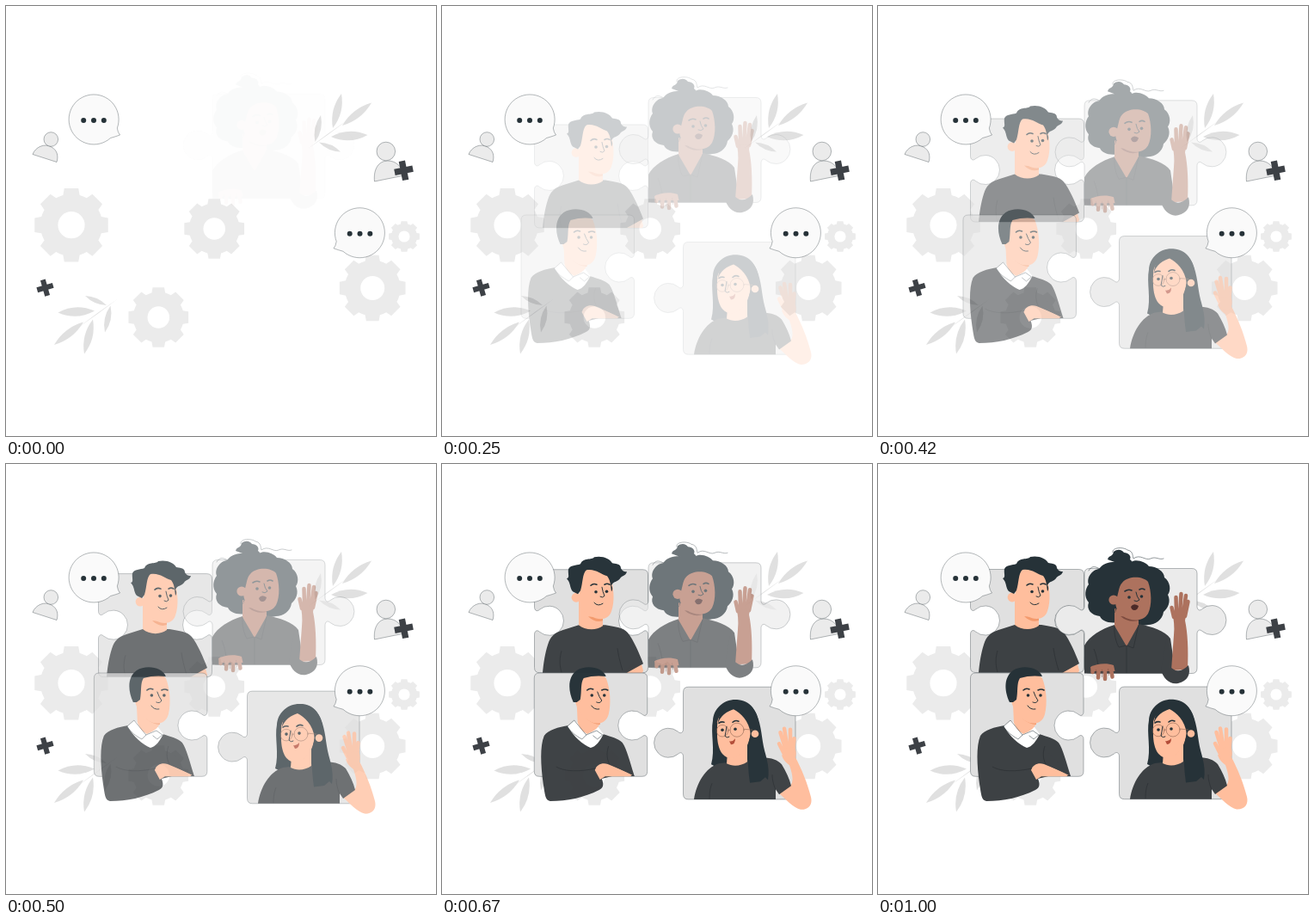
Animation of 500 by 500 pixels, one loop 1.04 s. Source, as an HTML page:

```html
<!DOCTYPE html>
<html lang="en">
<head>
<meta charset="utf-8">
<title>Puzzle team</title>
<style>
  html, body { margin: 0; width: 100%; height: 100%; overflow: hidden; background: #fff; }
  svg { display: block; width: 100vw; height: 100vh; }
  .ink { fill: #263238; }
  .cloth { fill: #3d4144; }
  .fair { fill: #ffbe9d; }
  .brown { fill: #ad725e; }
  .shade { fill: #f39a6d; }
  .line { fill: none; stroke: #263238; stroke-width: 1; stroke-linecap: round; stroke-linejoin: round; }
  .brow { fill: none; stroke: #263238; stroke-width: 1.6; stroke-linecap: round; }
  .thin { stroke: #263238; stroke-width: .35; }
  .fine { stroke-width: .5; }
  .fingers { fill: none; stroke-width: 4.5; stroke-linecap: round; }
  .fair.fingers { fill: none; stroke: #ffbe9d; }
  .brown.fingers { fill: none; stroke: #ad725e; }
  .fold { fill: none; stroke: #24292c; stroke-width: .5; }
</style>
</head>
<body>
<svg viewBox="0 0 500 500">
  <g id="gears" fill="#ebebeb" fill-rule="evenodd"></g>
  <g id="plant" fill="#e0e0e0"></g>
  <use href="#plant" transform="translate(481 506.5) rotate(180)"/>

  <g id="icons">
    <g class="thin" fill="#ebebeb">
      <path d="M31 172.5C34 164 45 159 53 164C60 168 61 175 59 181.5Z"/>
      <circle cx="52.3" cy="155" r="8.3"/>
      <path d="M428.5 204C427 190 433 180 444 180C453 180 460 186 463 197Z"/>
      <circle cx="441.8" cy="169" r="10.8"/>
    </g>
    <g stroke="#3d4146" fill="none">
      <path d="M-10.8 0H10.8M0-11.3V11.3" stroke-width="7.4" transform="translate(462.5 191.3) rotate(-11)"/>
      <path d="M-9.6 0H9.6M0-9.6V9.6" stroke-width="6" transform="translate(45.5 327.6) rotate(-16)"/>
    </g>
  </g>

  <g id="boy">
    <path class="piece thin" fill="#e0e0e0" data-box="107.5 122.5 132 120 182" data-tabs="-1 -1"/>
    <path class="fair" d="M214 242.5L231 229L234 240L233 242.5Z"/>
    <path class="cloth" d="M117 242.5C118 231 120 219 123 210C126 200 131 196 140 193L159 187H190C202 189 211 190 216 196C223 205 229 219 234 232L215 242.5Z"/>
    <path class="fold" d="M139 242C136 232 137 224 139 217M210 240C207 230 205 222 204 214"/>
    <path class="fair" d="M159 158V187C166 193 179 194 187 188V180Z"/>
    <path class="shade" d="M170 177C175 182 181 184 187 182V179Z"/>
    <circle class="fair" cx="156" cy="155" r="5.4"/>
    <path class="fair" d="M160 148L163 126C171 118 190 119 196 130C200 145 201 160 197 171C194 181 183 182 174 177C166 173 160 167 159 160Z"/>
    <path class="ink" d="M158 151L152 148C148 143 150 138 145 133C149 132 146 127 147 122C149 117 156 118 161 116C164 108 174 112 177 108C187 106 195 110 198 115C201 116 208 115 208 121C210 125 213 125 215 125C213 131 209 129 207 133C204 137 199 136 197 141C199 144 198 147 197 148C196 141 196 135 192 130C185 128 178 121 168 123C163 127 164 138 161 147Z"/>
    <path class="brow" d="M173 141Q176 138 180 140M189 140Q192 138 195 140"/>
    <path class="line" d="M186 143Q187 149 189 153Q187 156 184 154M177 161Q181 166 187 162"/>
    <g class="ink"><circle cx="179" cy="148.5" r="1.8"/><circle cx="191.5" cy="148" r="1.8"/></g>
  </g>

  <g id="curly">
    <path class="piece thin" fill="#ebebeb" data-box="240 121.5 131 122 181.5" data-tabs="1 1"/>
    <path class="ink" d="M267 111C268 106 273 108 274 102C279 98 284 100 286 103C291 103 295 107 293 111C299 115 292 119 287 118L294 114C301 110 311 114 315 119C324 119 333 125 333 132C340 137 341 147 337 152C341 160 337 168 332 172C331 181 322 187 314 187C305 189 291 188 279 184C268 186 260 182 258 177C248 176 242 169 245 161C239 154 241 145 245 140C242 132 249 123 257 122C262 115 269 114 275 114Z"/>
    <path class="line fine" d="M273 103C271 97 285 96 290 100C297 101 296 108 297 110C305 104 311 113 317 110C323 107 327 112 332 110M258 122C251 118 248 119 245 124"/>
    <path class="cloth" d="M240 243.5V211C246 200 259 192 275 187L289 209L303 186C318 189 334 194 340 203L346 243.5Z"/>
    <path class="brown" d="M275 168V188L289 212L303 187V174Z"/>
    <path class="fold" d="M275 188C274 197 277 208 280 213L289 211L297 214L303 187M289 211V243M257 242C256 232 254 222 251 215"/>
    <path d="M282 177Q291 185 303 182V179Z" fill="#7d4b3f"/>
    <circle class="brown" cx="274" cy="158" r="5.6"/>
    <path class="brown" d="M276 159C280 153 279 143 284 138C292 129 309 131 314 137C318 148 319 164 314 174C308 184 294 183 285 177C279 173 276 167 276 159Z"/>
    <circle class="line fine" cx="271.5" cy="169.5" r="5"/>
    <path class="brow" d="M287 148Q291 145 295 147M304 146Q307 144 310 146"/>
    <path class="line" d="M300 149Q301 155 304 158Q301 161 298 159"/>
    <g class="ink"><circle cx="292" cy="155" r="1.8"/><circle cx="306.5" cy="154" r="1.8"/></g>
    <path d="M294 166Q297 161 303 165Q302 170 298 170Q295 170 294 166Z" fill="#4b2a28"/>
    <path class="brown" d="M342 172C344 180 345 190 344 199L341 240L360 239C361 215 360 196 357 182L359 170Z"/>
    <path class="brown fingers" d="M344 178L341.500 167M347 174L346.500 155M351 174L352.500 151M355 174L358 153M357 177L360.500 160"/>
    <path class="cloth" d="M336 200C341 206 341 222 341 237Q350 245 361 234C364 245 360 252 349 255C339 257 332 249 329 240Z"/>
    <path class="brown fingers" d="M250 237L249.500 242M257 237L256 248.500M264 236L264 250M270.500 236L272.500 247.500"/>
    <path class="brown" d="M247 236C254 232 266 231 274 234L275.500 241H248Z"/>
    <path class="fold" d="M253.500 239V245M260.500 239V248M267.500 238L268.500 246" style="stroke:#7d4b3f"/>
  </g>

  <g id="man">
    <path class="piece thin" fill="#e0e0e0" data-box="107.5 243 131.5 120.3 304" data-tabs="0 -1"/>
    <path class="cloth" d="M148 304C135 306 124 309 119 316C114 328 115 350 118 372C120 384 120 391 126 392C146 392 165 388 183 379C189 376 188 371 186 366L198 363L224 363C219 347 215 331 210 324C205 319 197 317 187 314Z"/>
    <path fill="#fff" d="M146 305L154 298L165 306H182L188 314C184 322 179 329 173 330C163 326 154 317 146 305Z"/>
    <path class="fair" d="M157 280L158 301C161 308 164 311 169 314C176 311 181 308 184 302V296Z"/>
    <path class="line fine" d="M146 305L154 298L168 315L163 320C156 316 150 312 146 305M168 315L180 310L187 315L181 320L176 316"/>
    <path class="shade" d="M168 296Q176 303 184 303V299Z"/>
    <path class="fair" d="M157 266L162 247C172 243 187 243 191 249C196 262 197 278 194 291C191 303 179 304 170 298C162 293 157 284 155 276Z"/>
    <path class="ink" d="M153 277C146 262 147 247 157 240C168 233 187 236 191 247C184 246 174 246 165 249C161 255 163 264 161 274L157 277Z"/>
    <path class="brow" d="M169 263Q172 260 176 262M186 263Q190 261 193 263"/>
    <path class="line" d="M181 265Q183 271 186 275Q184 279 180 277M174 281Q177 286 183 285"/>
    <g class="ink"><circle cx="174.5" cy="269" r="1.8"/><circle cx="189" cy="269" r="1.8"/></g>
    <path class="fair" d="M178 356C180 349 187 347 193 349L222 361L219 363.3H190L184 367Z"/>
    <path class="cloth" d="M195 349C191 341 193 335 194 331L224 363C214 358 204 353 195 349Z"/>
    <path class="fold" d="M133 352C143 358 160 358 179 354M195 349C191 341 192 334 194 328"/>
  </g>

  <g id="girl">
    <path class="piece thin" fill="#e0e0e0" data-box="280.5 259 130.5 130.7 324" data-tabs="1 0"/>
    <path class="ink" d="M315 298C316 283 329 272 345 274C361 276 368 290 369 307L372 352L330 356C322 354 317 351 313 349C318 332 312 313 315 298Z"/>
    <path class="fair" d="M404 350C408 362 409 369 405 374L390 381C399 389 409 400 417 401.5C427 402 431 395 429 387C425 371 418 354 411 341L395 338C396 343 400 347 404 350Z"/>
    <path class="fair fingers" d="M398 337L392 325M400 333L393.5 312M402 332L398 307.5M405 332L405 308.5M408 335L409.500 319"/>
    <path class="fair" d="M396 331L410 329C413 335 412 343 407 346C400 346 395 339 396 331Z"/>
    <path class="cloth" d="M293 389.7C296 371 306 353 322 348L354 344C373 339 388 341 395 349C400 357 404 366 406 374L392 384L388 378V389.7Z"/>
    <path class="fold" d="M388 379C385 371 384 366 384 361M311 389C311 381 312 376 314 371"/>
    <path class="fair" d="M332 335L331 348C338 352 348 351 355 346V320Z"/>
    <path class="shade" d="M332 341Q344 341 350 334L340 338Z"/>
    <path class="fair" d="M320 300C322 290 330 284 340 284C350 287 357 296 359 309C358 327 350 339 338 342C326 342 321 332 320 317Z"/>
    <path class="ink" d="M324 285C333 273 351 273 361 283C369 292 371 309 373 323C375 337 382 350 379 367L376 364L370 369L358 370.5C356 356 355 342 356 326L359 314C357 298 347 289 339 285C332 287 323 292 320 304Z"/>
    <circle class="fair" cx="364" cy="313.5" r="4.3"/>
    <circle class="line fine" cx="365.5" cy="322.5" r="4"/>
    <g class="line" style="stroke:#8d6652;stroke-width:.6">
      <circle cx="326" cy="310" r="6.8"/><circle cx="343" cy="309" r="8"/><path d="M333 309H335M351 308L361 309"/>
    </g>
    <path class="brow" d="M322 301Q325 299 328 300M338 300Q341 297 345 299"/>
    <path class="line" d="M331 305Q330 312 329 316Q331 319 334 317"/>
    <g class="ink"><circle cx="326" cy="309" r="1.8"/><circle cx="341" cy="308" r="1.8"/></g>
    <path d="M334 322Q338 323 341 319Q341 326 336 326Z" fill="#b34d38"/>
  </g>

  <g id="bubble">
    <path class="thin" fill="#fafafa" d="M121.5 153.5A29 29 0 1 1 129.3 142Q130 147 132.5 150Q127 152 121.5 153.5Z"/>
    <g class="ink"><circle cx="90.2" cy="133" r="3"/><circle cx="102" cy="133" r="3"/><circle cx="113.8" cy="133" r="3"/></g>
  </g>
  <use href="#bubble" transform="translate(513.5 131.8) scale(-1 1)"/>
</svg>
<script>
  const LOOP = 1040, STEP = 1000 / 24, SHIFT = 20;
  const $ = id => document.getElementById(id);

  function addPath(parent, d) {
    const path = document.createElementNS('http://www.w3.org/2000/svg', 'path');
    path.setAttribute('d', d);
    parent.appendChild(path);
  }

  function gear(cx, cy, radius, hole) {
    const at = (angle, r) => `${cx + r * Math.cos(angle)} ${cy + r * Math.sin(angle)}`;
    const root = radius * 0.83;
    let d = '';
    for (let i = 0; i < 8; i++) {
      const a = i * Math.PI / 4;
      d += `${i ? `A${root} ${root} 0 0 1 ` : 'M'}${at(a - 0.27, root)}` +
        `L${at(a - 0.19, radius)}L${at(a + 0.19, radius)}L${at(a + 0.27, root)}`;
    }
    d += `A${root} ${root} 0 0 1 ${at(-0.27, root)}Z`;
    d += `M${cx - hole} ${cy}a${hole} ${hole} 0 1 0 ${2 * hole} 0a${hole} ${hole} 0 1 0 ${-2 * hole} 0Z`;
    addPath($('gears'), d);
  }

  // A pointed leaf; bulge is the control distance relative to its length.
  function leaf(x1, y1, x2, y2, bulge) {
    const mx = (x1 + x2) / 2, my = (y1 + y2) / 2;
    const nx = (y1 - y2) * bulge, ny = (x2 - x1) * bulge;
    addPath($('plant'), `M${x1} ${y1}Q${mx + nx} ${my + ny} ${x2} ${y2}Q${mx - nx} ${my - ny} ${x1} ${y1}Z`);
  }

  // One knob on a vertical edge: side is its x direction, dir the drawing direction.
  function knob(side, dir) {
    return `c0 ${4 * dir} ${3 * side} ${6 * dir} ${6 * side} ${3 * dir}` +
      `a17 17 0 1 ${side * dir > 0 ? 1 : 0} 0 ${26 * dir}` +
      `c${-3 * side} ${-3 * dir} ${-6 * side} ${-1 * dir} ${-6 * side} ${3 * dir}`;
  }

  function puzzlePiece(el) {
    const [x, y, w, h, mid] = el.dataset.box.split(' ').map(Number);
    const [left, right] = el.dataset.tabs.split(' ').map(Number);
    const r = 6, x2 = x + w, y2 = y + h;
    el.setAttribute('d', `M${x + r} ${y}H${x2 - r}q${r} 0 ${r} ${r}` +
      (right ? `V${mid - 16}${knob(right, 1)}` : '') +
      `V${y2 - r}q0 ${r} ${-r} ${r}H${x + r}q${-r} 0 ${-r} ${-r}` +
      (left ? `V${mid + 16}${knob(-left, -1)}` : '') +
      `V${y + r}q0 ${-r} ${r} ${-r}Z`);
  }

  gear(76, 254.7, 43.5, 15.6);
  gear(242.2, 259, 35.5, 12.8);
  gear(177.3, 362, 35.5, 12.8);
  gear(426.2, 328, 39, 14);
  gear(463, 268, 18.2, 6.6);

  leaf(351, 166, 398, 132, 0.015);
  leaf(380, 142, 390, 102, 0.22);
  leaf(391, 139, 425, 112.5, 0.2);
  leaf(378, 152, 420.5, 150, 0.25);
  leaf(364, 158.5, 389, 169.5, 0.2);
  leaf(359.5, 158, 366, 127, 0.22);

  document.querySelectorAll('.piece').forEach(puzzlePiece);

  const bezier = (s, a, b) => 3 * s * (1 - s) ** 2 * a + 3 * s * s * (1 - s) * b + s ** 3;

  function easeBack(x) {
    if (x >= 1) return 1;
    let low = 0, high = 1;
    for (let i = 0; i < 30; i++) {
      const s = (low + high) / 2;
      if (bezier(s, 0.36, 0.5) < x) low = s; else high = s;
    }
    return bezier(low, -0.01, 1.38);
  }

  function place(id, amount, dx, dy) {
    const rest = (1 - amount) * SHIFT;
    $(id).setAttribute('transform', `translate(${dx * rest} ${dy * rest})`);
    $(id).setAttribute('opacity', Math.min(1, Math.max(0, amount)));
  }

  // The motion advances 24 times a second, on 10 ms boundaries.
  function draw(time) {
    const tick = Math.floor((Math.floor(time / 10) * 10 + 4.9) / STEP);
    const progress = tick < 2 ? 0.02 : Math.min(1, tick / 24);
    const eased = tick < 2 ? 0 : easeBack(progress);
    place('boy', eased, 0, 1);
    place('curly', progress, 0, -1);
    place('man', eased, -1, 0);
    place('girl', eased, 0, 1);
  }

  function loop() {
    draw(performance.now() % LOOP);
    requestAnimationFrame(loop);
  }
  loop();
</script>
</body>
</html>
```
